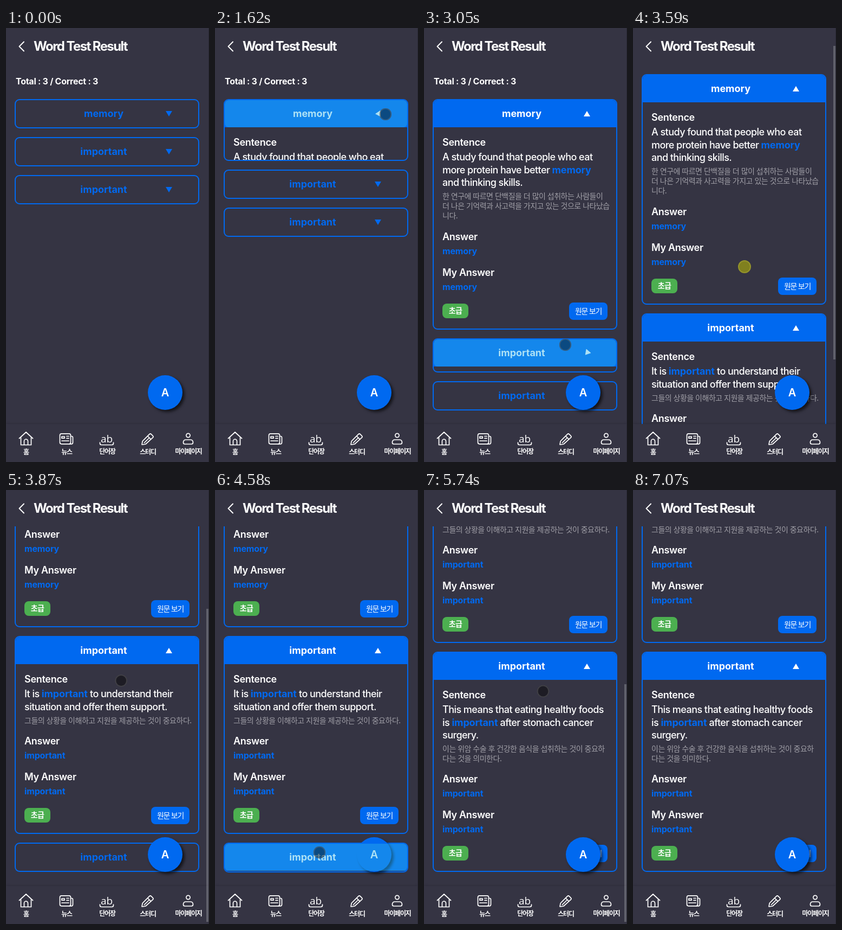
Write an HTML page that moves like this. It is 375 px wide and 800 px high and loops after 7470 ms.

```html
<!DOCTYPE html>
<html lang="ko">
<head>
<meta charset="utf-8">
<title>Word Test Result</title>
<style>
:root { --blue: #0069f0; --bg: #353443; }
* { box-sizing: border-box; }
html, body { margin: 0; width: 100%; height: 100%; overflow: hidden; background: var(--bg); }
#stage {
  position: relative; width: 375px; height: 800px; overflow: hidden;
  background: var(--bg); color: #fff;
  font-family: Inter, "Noto Sans CJK KR", sans-serif;
}
#stage div { position: absolute; }
#page { left: 0; top: 0; width: 375px; }
#total { left: 18px; top: 86px; font: 700 16px/24px Inter, sans-serif; letter-spacing: -.27px; white-space: nowrap; }
.card { left: 16px; width: 341px; border: 2px solid var(--blue); border-radius: 9px; overflow: hidden; }
.head { left: 0; top: 0; width: 100%; height: 50px; color: var(--blue); }
.open .head { background: var(--blue); color: #fff; }
.word { left: 62px; width: 201px; top: 13px; text-align: center; font: 700 18px/24px Inter, sans-serif; }
.arrow { left: 277px; top: 20px; width: 12px; height: 10px; background: currentColor; clip-path: polygon(0 0, 100% 0, 50% 100%); }
.line { left: 16px; white-space: nowrap; line-height: 24px; }
.title { font-size: 18px; font-weight: 600; letter-spacing: -.3px; }
.text { font-size: 18px; font-weight: 500; letter-spacing: -.55px; }
.text b { color: var(--blue); font-weight: 700; letter-spacing: -.15px; }
.ko { font-family: "Noto Sans CJK KR", sans-serif; font-size: 14px; letter-spacing: -.5px; color: #a09fa7; }
.reply { font-size: 16px; font-weight: 700; letter-spacing: -.15px; color: var(--blue); }
.badge, .more { font: 700 14px "Noto Sans CJK KR", sans-serif; text-align: center; white-space: nowrap; border-radius: 8px; }
.badge { left: 16px; width: 48px; height: 27px; line-height: 25px; letter-spacing: -.7px; background: #4caf50; }
.more { left: 250px; width: 71px; height: 32px; line-height: 30px; font-weight: 500; letter-spacing: -1.3px; background: var(--blue); }
#bar { left: 0; top: 0; width: 375px; height: 67px; background: var(--bg); }
#bar div { left: 51px; top: 18px; font-size: 24px; line-height: 32px; font-weight: 700; letter-spacing: -1.6px; white-space: nowrap; }
#fab {
  left: 262px; top: 640px; width: 64px; height: 64px; border-radius: 50%; background: var(--blue);
  box-shadow: 4px 4px 5px rgba(0, 0, 0, .6); text-align: center; font-size: 20px; font-weight: 600; line-height: 64px;
}
#tap { left: 18px; width: 337px; height: 50px; border-radius: 7px; background: rgba(51, 181, 229, .4); }
#nav { left: 0; top: 730px; width: 375px; height: 70px; background: var(--bg); box-shadow: 0 0 4px rgba(0, 0, 0, .25); }
#nav div { width: 75px; text-align: center; font: 700 12px/18px "Noto Sans CJK KR", sans-serif; letter-spacing: -1.2px; white-space: nowrap; }
svg { position: absolute; left: 0; top: 0; fill: none; stroke: #fff; stroke-width: 1.7; stroke-linecap: round; stroke-linejoin: round; }
#thumb { left: 370px; width: 4px; background: rgba(255, 255, 255, .22); }
#edge { left: 374px; top: 0; width: 1px; height: 800px; background: #2b2a37; }
#dot { left: 0; top: 0; width: 24px; height: 24px; border-radius: 50%; background: rgba(0, 0, 0, .45); border: 2px solid rgba(128, 128, 128, .35); }
#dot.down { background: #80801f; border-color: #95942b; }
</style>
</head>
<body>
<div id="stage">
  <div id="page"><div id="total">Total : 3 / Correct : 3</div></div>
  <div id="bar">
    <svg width="50" height="67" style="stroke-width:2"><path d="M33 25.5 24.5 34 33 42.5"/></svg>
    <div>Word Test Result</div>
  </div>
  <div id="fab">A</div>
  <div id="tap"></div>
  <div id="nav">
    <svg width="375" height="70">
      <path d="M24.5 26.5 37 15 49.5 26.5M27.5 24.5V38.5H46.5V24.5M33.5 38V31.5a3.5 3.5 0 0 1 7 0V38"/>
      <rect x="99.5" y="17.8" width="20" height="19" rx="3"/>
      <path d="M119.5 22.5h1.5q2.5 0 2.5 2.5v9q0 2.8-2.8 2.8h-4M103 23h5v3.2h-5zM112 22.5h4M112 26.3h4M103 31h13"/>
      <text x="186" y="34" text-anchor="middle" font-size="19" font-family="Open Sans, sans-serif" fill="#fff" stroke="none">ab</text>
      <path d="M173.5 34v1.5q0 3 3 3h19q3 0 3-3V34"/>
      <path d="M251 38l1.2-6.5 12.6-12.6q1.8-1.8 3.6 0l2.7 2.7q1.8 1.8 0 3.6L258 37zM261.5 22l6.3 6.3M255.5 34.5l9-9"/>
      <circle cx="336.5" cy="21" r="3.6"/>
      <path d="M327.5 34q0-5 5-5h8q5 0 5 5 0 3-3 3h-12q-3 0-3-3z"/>
    </svg>
  </div>
  <div id="edge"></div>
  <div id="thumb"></div>
  <div id="dot"></div>
</div>
<script>
const LOOP = 7470, OPEN_MS = 250, CLOSED = 54, GAP = 16, FIRST = 131;
const $ = id => document.getElementById(id);

const cards = [
  { word: 'memory', full: 425, start: 1550,
    text: ['A study found that people who eat', 'more protein have better <b>memory</b>', 'and thinking skills.'],
    ko: ['한 연구에 따르면 단백질을 더 많이 섭취하는 사람들이', '더 나은 기억력과 사고력을 가지고 있는 것으로 나타났습', '니다.'] },
  { word: 'important', full: 365, start: 3021,
    text: ['It is <b>important</b> to understand their', 'situation and offer them support.'],
    ko: ['그들의 상황을 이해하고 지원을 제공하는 것이 중요하다.'] },
  { word: 'important', full: 406, start: 4570,
    text: ['This means that eating healthy foods', 'is <b>important</b> after stomach cancer', 'surgery.'],
    ko: ['이는 위암 수술 후 건강한 음식을 섭취하는 것이 중요하', '다는 것을 의미한다.'] },
];

// Rows of [time, value, ...], linear in between.
const SCROLL = [[3545, 0], [3580, 46], [3605, 46], [3680, 185], [3760, 303], [5060, 303], [5190, 457], [5215, 457], [5270, 560], [5340, 655]];
const THUMB = [[3545, 0], [3546, 1], [3900, 1], [4070, 0], [5060, 0], [5061, 1], [5740, 1], [5930, 0]];
const DOT = [
  [930, 372, 136], [1150, 315, 158], [1480, 315, 159], [2560, 315, 159], [2720, 298, 300], [2900, 263, 560],
  [2990, 261, 584], [3340, 261, 584], [3520, 210, 500], [3580, 206, 440], [3605, 206, 440], [3690, 216, 330],
  [3800, 215, 335], [4080, 206, 400], [4160, 205, 401], [4480, 193, 668], [4930, 193, 668], [5040, 199, 643],
  [5190, 214, 474], [5215, 214, 474], [5340, 220, 371],
];
const DOT_FADE = [[5740, 1], [5930, 0]];
const PRESS = [[1480, 1560], [2950, 3020], [3500, 3700], [4500, 4565], [5010, 5180]];
const TAP = [[1480, 1870], [2950, 3250], [4500, 4840]];

function at(rows, t) {
  const i = rows.findIndex(r => r[0] > t);
  if (i === 0) return rows[0].slice(1);
  if (i < 0) return rows[rows.length - 1].slice(1);
  const a = rows[i - 1], b = rows[i], k = (t - a[0]) / (b[0] - a[0]);
  return a.slice(1).map((v, j) => v + (b[j + 1] - v) * k);
}
const within = (spans, t) => spans.findIndex(([a, b]) => t >= a && t < b);
const easeInOut = k => k < .5 ? 2 * k * k : 1 - 2 * (1 - k) ** 2;
const easeOut = k => 1 - (1 - k) ** 2;

function add(parent, cls, html = '', top) {
  const el = document.createElement('div');
  el.className = cls;
  el.innerHTML = html;
  if (top !== undefined) el.style.top = top + 'px';
  parent.append(el);
  return el;
}

for (const c of cards) {
  c.el = add($('page'), 'card');
  const head = add(c.el, 'head');
  add(head, 'word', c.word);
  c.arrow = add(head, 'arrow');
  // y is the middle of the line, from the card's outer top edge
  const line = (cls, html, y) => add(c.el, 'line ' + cls, html, y - 14);
  line('title', 'Sentence', 80);
  c.text.forEach((s, i) => line('text', s, 107 + i * 23.6));
  c.ko.forEach((s, i) => line('ko', s, 107.5 + c.text.length * 23.6 + i * 18));
  line('title', 'Answer', c.full - 171);
  line('reply', c.word, c.full - 145);
  line('title', 'My Answer', c.full - 105);
  line('reply', c.word, c.full - 79);
  add(c.el, 'badge', '초급', c.full - 50);
  add(c.el, 'more', '원문 보기', c.full - 52);
}

['홈', '뉴스', '단어장', '스터디', '마이페이지'].forEach((s, i) => {
  add($('nav'), '', s, i % 2 || !i ? 42 : 41).style.left = i * 75 - .5 + 'px';
});

function draw(t) {
  const [scroll] = at(SCROLL, t);
  let y = FIRST;
  for (const c of cards) {
    const k = Math.min(1, Math.max(0, (t - c.start) / OPEN_MS));
    const h = Math.round(CLOSED + (c.full - CLOSED) * easeInOut(k));
    c.top = y;
    c.el.style.top = y + 'px';
    c.el.style.height = h + 'px';
    c.el.classList.toggle('open', t >= c.start);
    c.arrow.style.transform = `rotate(${180 * easeOut(k)}deg)`;
    y += h + GAP;
  }
  $('page').style.top = -Math.round(scroll) + 'px';

  const tapped = within(TAP, t);
  $('tap').style.display = tapped < 0 ? 'none' : 'block';
  if (tapped >= 0) $('tap').style.top = cards[tapped].top + 2 - Math.round(scroll) + 'px';

  const unit = 796 / (y - GAP + 96);
  $('thumb').style.top = scroll * unit + 'px';
  $('thumb').style.height = 800 * unit + 'px';
  $('thumb').style.opacity = at(THUMB, t)[0];

  const [dx, dy] = at(DOT, t), down = within(PRESS, t) >= 0;
  $('dot').classList.toggle('down', down);
  $('dot').style.opacity = t < 930 ? 0 : at(DOT_FADE, t)[0];
  $('dot').style.transform = `translate(${dx - 12}px, ${dy - 12}px) scale(${down ? 1 : .94})`;

  $('edge').style.display = t >= 7000 && t < 7070 ? 'none' : 'block';
}

const begin = performance.now();
function tick() {
  draw((performance.now() - begin) % LOOP);
  requestAnimationFrame(tick);
}
tick();
</script>
</body>
</html>
```
